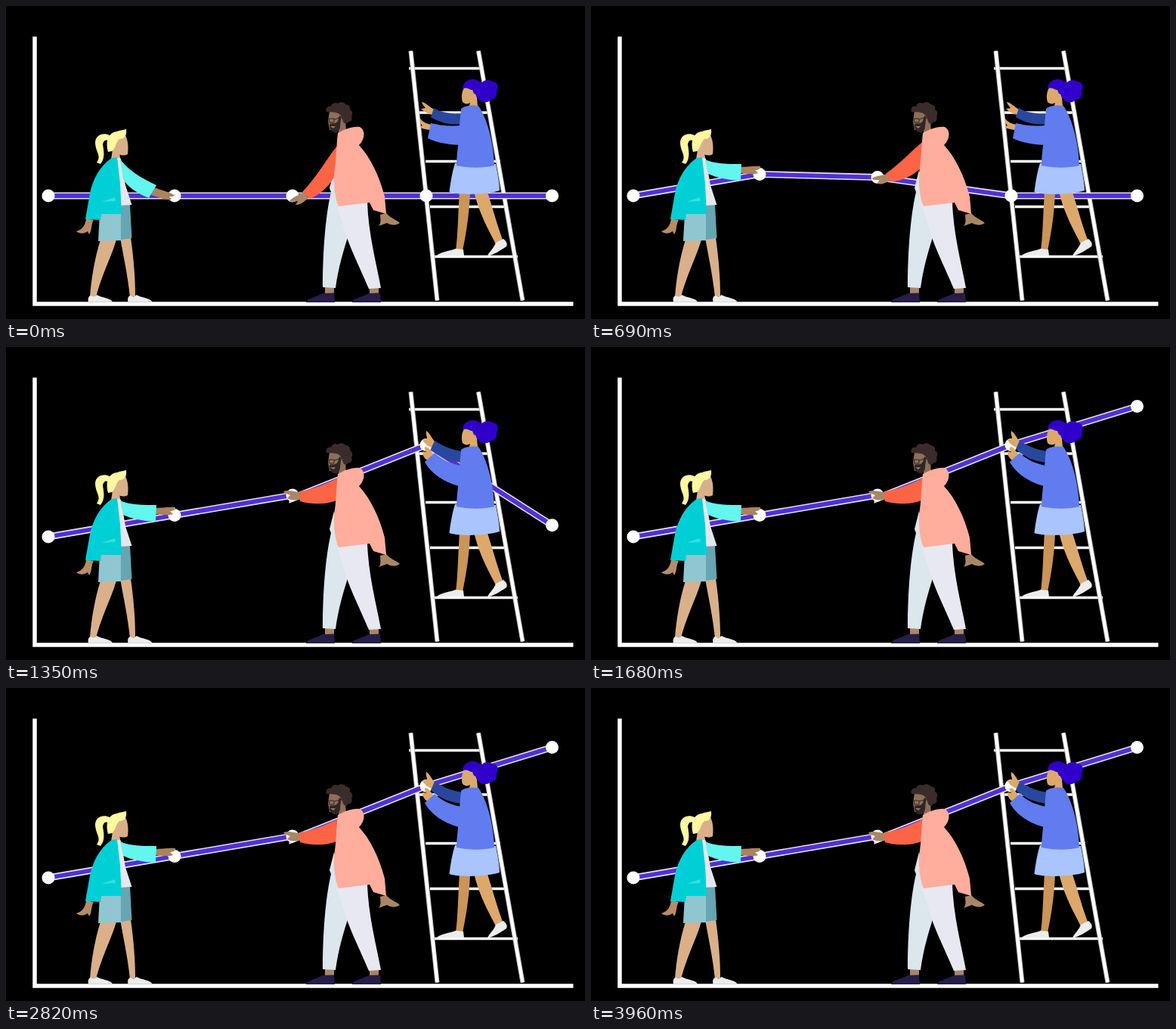
Recreate the animation shown at these times as an HTML page. Size 766 by 414 pixels, loop 4020 ms.

```html
<!DOCTYPE html>
<html lang="en">
<head>
<meta charset="utf-8">
<title>Raising the chart</title>
<style>
  html, body { margin: 0; width: 100%; height: 100%; overflow: hidden; background: #000; }
  svg { display: block; width: 766px; height: 414px; }
  .white { fill: none; stroke: #fff; }
  .tan { fill: #d9b08a; }
  .shoe { fill: #ececec; }
  .brown { fill: #a98766; }
  .navy { fill: #261d48; }
  .gold { fill: #dda86b; }
</style>
</head>
<body>
<svg viewBox="0 0 766 414">
  <path class="white" stroke-width="5.5" d="M38 40.5V394H750.5"/>

  <g class="white">
    <path stroke-width="3.6" d="M533 82.5H629M544 141H638M555 205.5H654M561 265.5H662M566 331.5H677"/>
    <path id="rails" stroke="#bdbdbd" stroke-width="6" d="M535.5 59.5L570.5 389.5M625 59.5L683.5 389.5"/>
    <path stroke-width="4" d="M535.5 59.5L570.5 389.5M625 59.5L683.5 389.5"/>
  </g>

  <g id="chart">
    <polyline class="line" fill="none" stroke="#e4e0f4" stroke-width="9"/>
    <polyline class="line" fill="none" stroke="#5230d6" stroke-width="5.8"/>
  </g>

  <g id="girl">
    <path class="tan" d="M125 309L146 309C141 328 128 352 119 385L111 385C113 360 117 335 125 309ZM151 306L165 306C169 335 171 360 171 384L164 385C161 355 155 330 151 306Z"/>
    <path class="shoe" id="shoe" d="M109 391.5C108 387 109 384 112 383C115 385 118 385 120 382C126 386 139 386 141 391.5Z"/>
    <use href="#shoe" x="52.5"/>
    <path fill="#8fc6cf" d="M124 274L153 274L154 310L122 311Z"/>
    <path fill="#66a5b1" d="M152 263L164 262L166.500 307L152 309Z"/>
    <path fill="#b68d67" d="M106 281L116 283C112 290 114 297 110 302L108 298C104 301 98 302 93 298C101 296 105 290 106 281Z"/>
    <path class="tan" d="M141 190L150 195L152 205L139 203Z"/>
    <path fill="#e6e8ef" d="M146 200L152 202L158 237L166.500 263L150 264Z"/>
    <path fill="#00cfd6" d="M140 201C125 211 115 228 111 248L105 282L125 283L126 275L153 275L151 235L147 200Z"/>
    <path fill="#35e0de" d="M126 259L144 253L145 258Z"/>
    <path class="tan" d="M144 172L158 171C162 179 162 189 161 196C156 199 150 197 147 195L140 192Z"/>
    <path fill="#fff8a0" d="M135 193C131 178 136 167 147 166C151 164 156 164 159 163C160 171 157 176 150 176C145 180 145 189 140 192Z"/>
    <path fill="#fff8a0" d="M137 171C129 167 119 170 118 180C118 193 127 198 120 207L125 209C132 201 129 190 128 183C129 178 132 176 136 179Z"/>
    <path fill="#ab835e" class="girlHand"/>
    <path fill="#62f6ef" class="girlArm"/>
  </g>

  <g id="man">
    <path class="brown" d="M422 370H434V382H422ZM481 370H493V382H481Z"/>
    <path class="navy" id="boot" d="M397 392C397 387 408 386 419 380L434 379.500L435 392Z"/>
    <use href="#boot" x="61"/>
    <path fill="#dbe6ed" d="M434 217L440 245L453 303C446 325 440 345 436 373L419 372C419 330 422 280 430 246L428 241Z"/>
    <path fill="#e8e8f2" d="M437 262L478 258C479 300 490 340 496 373L480 374C470 350 455 320 449 300Z"/>
    <path class="brown" d="M495 276L503 274C509 281 517 283 521 287C515 291 509 290 504 287L493 291C497 286 495 281 495 276Z"/>
    <path fill="#8e6f58" d="M428 139L446 139L453 148C448 154 449 160 451 167L440 169L440 164L428 164L426 152Z"/>
    <path fill="#30262a" d="M428 156C432 154 436 157 439 152L441 145L444 147C441 155 444 164 438 167C433 168 427 165 428 156Z"/>
    <path fill="#9b755b" d="M429 159L436 159L433 162Z"/>
    <path fill="none" stroke="#302624" d="M427 149H434V154H428ZM434 150L444 147"/>
    <path fill="#3b2c2b" d="M424 140C422 136 426 131 430 133C431 128 436 127 439 129C442 126 448 127 449 130C454 130 456 134 455 137C459 139 459 144 457 146C459 150 456 154 453 153C451 157 447 156 446 153L444 147C440 139 434 141 424 140Z"/>
    <path class="brown manHand"/>
    <path fill="#fb6546" class="manArm"/>
    <path fill="#ffad9d" d="M439 168C449 163 457 159 468 160C476 164 475 176 467 184C482 200 494 225 501 252L503 275L486 270L481 260L440 265C435 255 433 232 434 222C437 205 437 185 439 168Z"/>
  </g>

  <g id="climber">
    <path fill="#cb9458" d="M600 245L614 246C613 275 609 300 604 324L595 324C598 300 598 275 600 245Z"/>
    <path class="gold" d="M619 245L636 243C643 265 650 290 657 309L648 315C638 295 626 275 619 245Z"/>
    <path class="shoe" d="M570 330C575 325 588 324 595 321L605 322L606 330ZM648 313L658 308C662 311 664 315 662 318C655 323 645 329 637 331C638 326 646 320 648 313Z"/>
    <path fill="#aac4fd" d="M594 208L648 209C651 225 653 236 653 244C640 249 600 251 586.500 246C588 235 590 220 594 208Z"/>
    <path class="gold climbHandBack"/>
    <path fill="#2a479f" class="climbArmBack"/>
    <path class="gold" d="M606 108L622 108L624 133L613 132L614 128C611 130 607 130 604 127C602 120 603 114 606 108Z"/>
    <path fill="#3000ca" d="M604 109C605 100 613 96 620 97C624 98 627 100 629 102C632 97 640 97 643 100C650 100 653 107 649 113C650 119 647 124 641 124C638 129 627 128 625 123C621 121 623 116 619 116L617 111C613 111 611 107 604 109Z"/>
    <path fill="#617cee" d="M602 136C608 131 619 131 625 132C637 150 645 180 646 211C630 215 610 214 596 211C596 195 600 175 600 158Z"/>
    <path class="gold climbHand"/>
    <path fill="#617cee" class="climbArm"/>
  </g>
</svg>
<script>
const LOOP = 4020, RISE = 380;

// x, resting y, raised y, start of the rise, final sag where the next segment leaves
const points = [
  [56, 251, 251, 0, 0],
  [223, 251, 222.5, 110, 0],
  [379, 251, 196, 512, 4],
  [556, 251, 129.5, 895, 0],
  [722.5, 251, 78.5, 1271, 0]
];

// class, start, duration, lowered shape, raised shape
const limbs = [
  ['girlArm', 110, RISE,
    'M151 203C162 217 179 228 199 237L189 254C171 247 159 237 155 229Z',
    'M151 203C163 209 182 209 199 209L198 231C180 230 166 227 155 222Z'],
  ['girlHand', 110, RISE,
    'M196 240C204 243 213 245 223 250C221 253 218 252 216 252L219 256C209 257 202 253 192 250Z',
    'M197 213C206 213 215 211 224 212C225 215 221 217 217 217L221 221C212 224 206 221 197 221Z'],
  ['manArm', 512, RISE,
    'M440 183C427 197 414 223 392 246L402 255C415 250 428 238 437 222Z',
    'M440 173C425 180 405 189 388 191L389 204C405 209 425 208 437 203Z'],
  ['manHand', 512, RISE,
    'M393 246C387 251 380 252 375 258C379 260 383 258 386 258L383 263C391 263 395 258 400 254Z',
    'M390 192C382 192 375 188 367 191C369 195 373 194 376 196L372 200C379 204 384 202 391 202Z'],
  ['climbArmBack', 1090, 180,
    'M604 142C590 143 575 141 566 135L562 147C575 155 590 158 604 156Z',
    'M606 138C592 137 580 132 567 124L562 135C572 145 588 152 605 153Z'],
  ['climbHandBack', 1090, 180,
    'M567 137C560 134 556 128 550 127C551 131 554 133 555 135L549 136C553 140 558 142 563 144Z',
    'M568 126C563 121 562 115 556 111C555 115 557 118 557 121L551 123C554 128 558 131 563 133Z'],
  ['climbArm', 1090, 180,
    'M606 157C590 160 574 158 562 155L558 175C570 181 588 184 606 184Z',
    'M606 158C590 155 577 150 567 140L554 152C562 167 580 180 604 185Z'],
  ['climbHand', 1090, 180,
    'M563 157C557 156 552 154 548 149C546 152 549 156 551 158L547 160C551 163 556 163 561 164Z',
    'M567 143C561 138 562 134 555 132C552 134 555 137 556 139L551 138C551 144 554 148 558 150Z']
];

const find = name => document.querySelector('.' + name);
const mix = (a, b, k) => a + (b - a) * k;
const ease = x => x < .5 ? 2 * x * x : 1 - 2 * (1 - x) ** 2;
const progress = (t, start, length) => ease(Math.min(1, Math.max(0, (t - start) / length)));

function morph(from, to, k) {
  const goal = to.match(/[\d.]+/g);
  let i = 0;
  return from.replace(/[\d.]+/g, n => mix(+n, +goal[i++], k).toFixed(2));
}

const lines = document.querySelectorAll('.line');
const parts = limbs.map(([name]) => find(name));
const dots = points.map(([x]) => {
  const dot = document.createElementNS('http://www.w3.org/2000/svg', 'circle');
  dot.setAttribute('cx', x);
  dot.setAttribute('r', 8.5);
  dot.setAttribute('fill', '#fff');
  return document.getElementById('chart').appendChild(dot);
});

function draw() {
  const t = performance.now() % LOOP;
  const lift = points.map(([, , , start]) => progress(t, start, RISE));
  const heights = points.map(([, low, high], i) => mix(low, high, lift[i]));
  const track = points.map(([x, , , , sag], i) =>
    `${x},${heights[i]} ${x},${heights[i] + sag * (lift[i + 1] || 0)}`).join(' ');
  lines.forEach(line => line.setAttribute('points', track));
  dots.forEach((dot, i) => dot.setAttribute('cy', heights[i]));
  limbs.forEach(([, start, length, from, to], i) =>
    parts[i].setAttribute('d', morph(from, to, progress(t, start, length))));
  requestAnimationFrame(draw);
}
draw();
</script>
</body>
</html>
```
